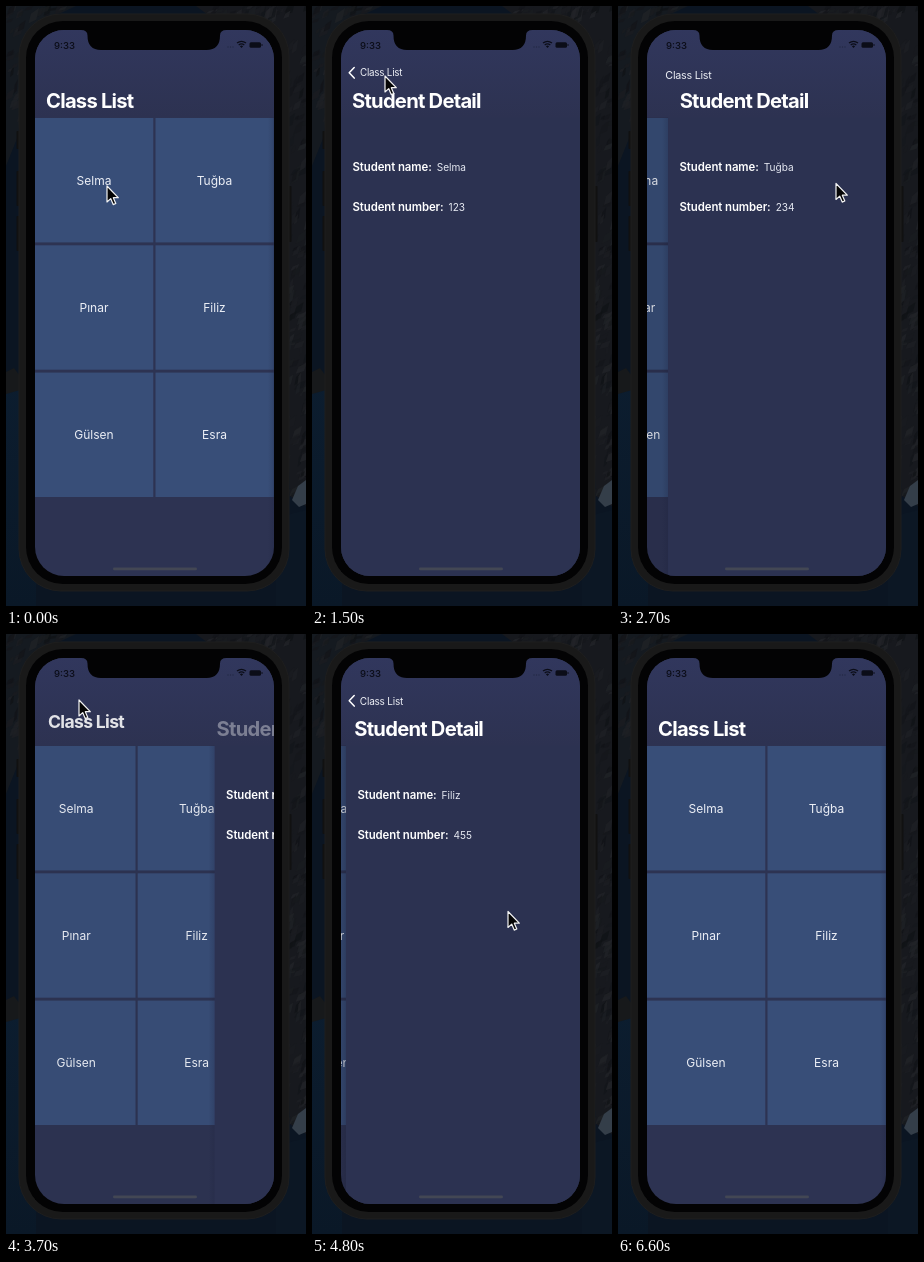
These frames come from a looping animation (300 px wide and 600 px high, 7400 ms). An HTML page:

```html
<!DOCTYPE html>
<html lang="en">
<head>
<meta charset="utf-8">
<title>Class List</title>
<style>
  html, body { margin: 0; width: 100%; height: 100%; overflow: hidden; background: #0b1522; }
  svg { display: block; width: 300px; height: 600px; }
  text { font-family: Inter, Roboto, "Liberation Sans", sans-serif; fill: #fff; white-space: pre; }
  .time { font-size: 9.6px; font-weight: 500; fill: #0b0d18; }
  .title { font-size: 20.2px; font-weight: 700; letter-spacing: -.76px; }
  .back { font-size: 9.8px; letter-spacing: -.22px; fill: #eef0f6; }
  .cell { font-size: 12px; fill: #eceff6; text-anchor: middle; }
  .row { font-size: 11.4px; font-weight: 600; letter-spacing: -.08px; }
  .value { font-size: 10.1px; font-weight: 400; fill: #e6e9f2; letter-spacing: 0; }
</style>
</head>
<body>
<svg viewBox="0 0 300 600" xmlns="http://www.w3.org/2000/svg">
  <defs>
    <linearGradient id="bar" x1="0" y1="0" x2="0" y2="1">
      <stop offset="0" stop-color="#31375d"/>
      <stop offset="1" stop-color="#2d3251"/>
    </linearGradient>
    <linearGradient id="water" x1="0" y1="0" x2="0" y2="1">
      <stop offset="0" stop-color="#0c1d2f"/>
      <stop offset="1" stop-color="#0a1827"/>
    </linearGradient>
    <linearGradient id="edge">
      <stop offset="0" stop-color="#1a1f3a" stop-opacity="0"/>
      <stop offset="1" stop-color="#1a1f3a" stop-opacity=".22"/>
    </linearGradient>
    <clipPath id="screen"><rect x="29" y="24" width="239" height="546" rx="29"/></clipPath>
  </defs>

  <!-- desktop -->
  <rect width="300" height="600" fill="#0b1522"/>
  <path d="M0 0H70L40 14L18 60L12 130L0 160Z" fill="#151a20"/>
  <path d="M190 0H300V500L284 490L270 60Z" fill="#17191e"/>
  <path d="M0 372H30V600H0Z" fill="url(#water)"/>
  <path d="M0 366L8 362L14 370V384L0 388Z" fill="#17191b"/>
  <g id="rocks"></g>
  <path d="M300 474L292 480L286 494L293 501L300 498Z" fill="#343e49"/>
  <path d="M300 504L270 512V600H300Z" fill="#0c1724"/>

  <!-- phone -->
  <g fill="#111">
    <rect x="10.500" y="125" width="4" height="18" rx="1"/>
    <rect x="10.500" y="165" width="4" height="35" rx="1"/>
    <rect x="10.500" y="210" width="4" height="35" rx="1"/>
    <rect x="281.500" y="180" width="4" height="56" rx="1"/>
  </g>
  <rect x="13" y="8" width="270" height="577" rx="42" fill="#191919" stroke="#1e1e1e" stroke-width="1"/>
  <rect x="20" y="15" width="256" height="563" rx="37" fill="#030304"/>

  <g clip-path="url(#screen)">
    <rect x="29" y="24" width="239" height="546" fill="#2d3352"/>
    <g id="list"></g>
    <rect id="dim" x="29" y="111" width="239" height="459" fill="#000"/>
    <g id="detail">
      <rect x="23" y="111" width="6" height="459" fill="url(#edge)"/>
      <rect x="29" y="110" width="239" height="460" fill="#2c3251"/>
      <text class="row" x="40.500" y="165">Student name:<tspan id="name" class="value" dx="5"></tspan></text>
      <text class="row" x="40.500" y="205">Student number:<tspan id="number" class="value" dx="5"></tspan></text>
    </g>
    <rect x="29" y="24" width="239" height="87.500" fill="url(#bar)"/>
    <text id="big" class="title">Class List</text>
    <text id="back" class="back">Class List</text>
    <text id="head" class="title" y="102">Student Detail</text>
    <path id="chevron" d="M42.200 61.500L37.200 66.800L42.200 72.100" fill="none" stroke="#fff" stroke-width="1.500" stroke-linecap="round" stroke-linejoin="round"/>

    <text class="time" x="48" y="42.500">9:33</text>
    <g fill="#0b0d18">
      <g opacity=".3">
        <circle cx="222" cy="41" r=".7"/><circle cx="224.500" cy="41" r=".7"/><circle cx="227" cy="41" r=".7"/>
      </g>
      <path d="M235.500 42L233.900 40.200Q235.500 39 237.100 40.200Z"/>
      <g fill="none" stroke="#0b0d18" stroke-width="1.300">
        <path d="M232.700 38.900Q235.500 36.800 238.300 38.900"/>
        <path d="M231 37.100Q235.500 33.600 240 37.100"/>
      </g>
      <rect x="243.500" y="36.200" width="11.500" height="5.600" rx="1.500"/>
      <rect x="255.500" y="38" width="1" height="2" rx=".5"/>
    </g>
    <rect x="107" y="561.500" width="84" height="2.800" rx="1.400" fill="#434754"/>
  </g>
  <path d="M75 23V24Q81.500 24 81.500 29.500Q81.500 44 95 44H200.500Q214 44 214 29.500Q214 24 220.500 24V23Z" fill="#030304"/>

  <path id="cursor" d="M0 0V16L3.700 12.600L6.200 18.600L8.800 17.500L6.300 11.700H11.300Z" fill="#050505" stroke="#f4f4f4" stroke-width="1.200" stroke-linejoin="round"/>
</svg>

<script>
const LOOP = 7400, STEP = 100;
const WIDTH = 239, PARALLAX = 71.6, RATE = .015;

const names = ['Selma', 'Tuğba', 'Pınar', 'Filiz', 'Gülsen', 'Esra'];

// open time, close time, student, number
const visits = [
  [47, 1525, 0, '123'],
  [2430, 3520, 1, '234'],
  [4413, 5820, 3, '455']
];

// time, x, y of the pointer tip
const path = [
  [0, 101, 180], [900, 101, 180], [1100, 96, 158], [1300, 80, 95], [1500, 73, 70],
  [1900, 73, 70], [2000, 120, 80], [2100, 240, 120], [2200, 276, 160], [2300, 218, 177.5],
  [2700, 218, 177.5], [2900, 286, 235], [3000, 220, 260], [3200, 33, 235], [3400, 73, 66],
  [3800, 73, 66], [3900, 110, 27], [4000, 220, 60], [4100, 286, 160], [4300, 196, 277.5],
  [4800, 196, 277.5], [5200, 81, 185], [5400, 70, 110], [5600, 73, 66],
  [6100, 73, 66], [6400, 72, 40]
];
const HIDE = 6500;

const $ = id => document.getElementById(id);
const [rocks, list, dim, detail, big, back, head, chevron, cursor, nameText, numberText] =
  ['rocks', 'list', 'dim', 'detail', 'big', 'back', 'head', 'chevron', 'cursor', 'name', 'number'].map($);

const clamp = v => Math.max(0, Math.min(1, v));
const set = (el, key, value) => el.setAttribute(key, value);
const move = (el, x, y = 0, scale = 1) => set(el, 'transform', `translate(${x} ${y}) scale(${scale})`);

function add(parent, tag, attrs, text = '') {
  const el = document.createElementNS('http://www.w3.org/2000/svg', tag);
  for (const key in attrs) set(el, key, attrs[key]);
  el.textContent = text;
  parent.append(el);
}

let seed = 7;
const random = () => (seed = seed * 16807 % 2147483647) / 2147483647;

// slanted facets of dark stone
function stones(x, y, width, height, count) {
  while (count--) {
    const px = x + random() * width, py = y + random() * height;
    const w = 3 + random() * 6, h = 3 + random() * 9, shade = 16 + Math.floor(random() * 20);
    add(rocks, 'path', {
      d: `M${px} ${py}l${w} ${-h / 2}l${-w / 3} ${h}l${-w} ${h / 3}Z`,
      fill: `rgb(${shade} ${shade + 2} ${shade + 6})`, opacity: .7
    });
  }
}
stones(280, 0, 20, 490, 130);
stones(200, 0, 90, 9, 24);
stones(0, 0, 14, 120, 24);
stones(0, 0, 60, 8, 12);

names.forEach((name, i) => {
  const x = 29 + i % 2 * 120.5, y = 112 + Math.floor(i / 2) * 127.3;
  add(list, 'rect', { x, y, width: 118.3, height: 124.4, fill: '#384e78' });
  add(list, 'text', { class: 'cell', x: x + 59, y: y + 66.5 }, name);
});

function spring(ms) {
  if (ms <= 0) return 0;
  const k = RATE * ms, rest = (1 + k) * Math.exp(-k);
  return rest < .0015 ? 1 : 1 - rest;
}

function pointer(t) {
  const i = path.findIndex(p => p[0] > t);
  if (i < 0) return path[path.length - 1].slice(1);
  const [t0, x0, y0] = path[i - 1], [t1, x1, y1] = path[i];
  const k = (t - t0) / (t1 - t0);
  return [x0 + (x1 - x0) * k, y0 + (y1 - y0) * k];
}

function draw(t) {
  const [open, close, who, number] = visits.filter(v => v[0] <= t).pop() || visits[0];
  const q = t < close ? spring(t - open) : 1 - spring(t - close);
  const shift = WIDTH * (1 - q);

  move(list, -PARALLAX * q);
  set(dim, 'opacity', .1 * q);
  move(detail, shift);
  nameText.textContent = names[who];
  numberText.textContent = number;

  // the large title shrinks into the back label
  const x = 40 + 8 * q, y = 102 - 32 * q, width = 88 - 46 * q;
  move(big, x, y, width / 88);
  move(back, x, y, width / 42);
  set(big, 'opacity', clamp((.8 - q) / .64));
  set(back, 'opacity', clamp((q - .4) / .4));

  move(head, 40 + Math.max(0, q > .9 ? shift * 1.2 - 3.6 : shift * .95));
  set(head, 'opacity', clamp(q * 1.5));
  set(chevron, 'opacity', clamp((q - .92) / .05));

  move(cursor, ...pointer(t));
  set(cursor, 'visibility', t < HIDE ? 'visible' : 'hidden');
}

const start = performance.now();
function tick() {
  const t = (performance.now() - start) % LOOP;
  draw(Math.floor(t / STEP) * STEP);
  requestAnimationFrame(tick);
}
tick();
</script>
</body>
</html>
```
